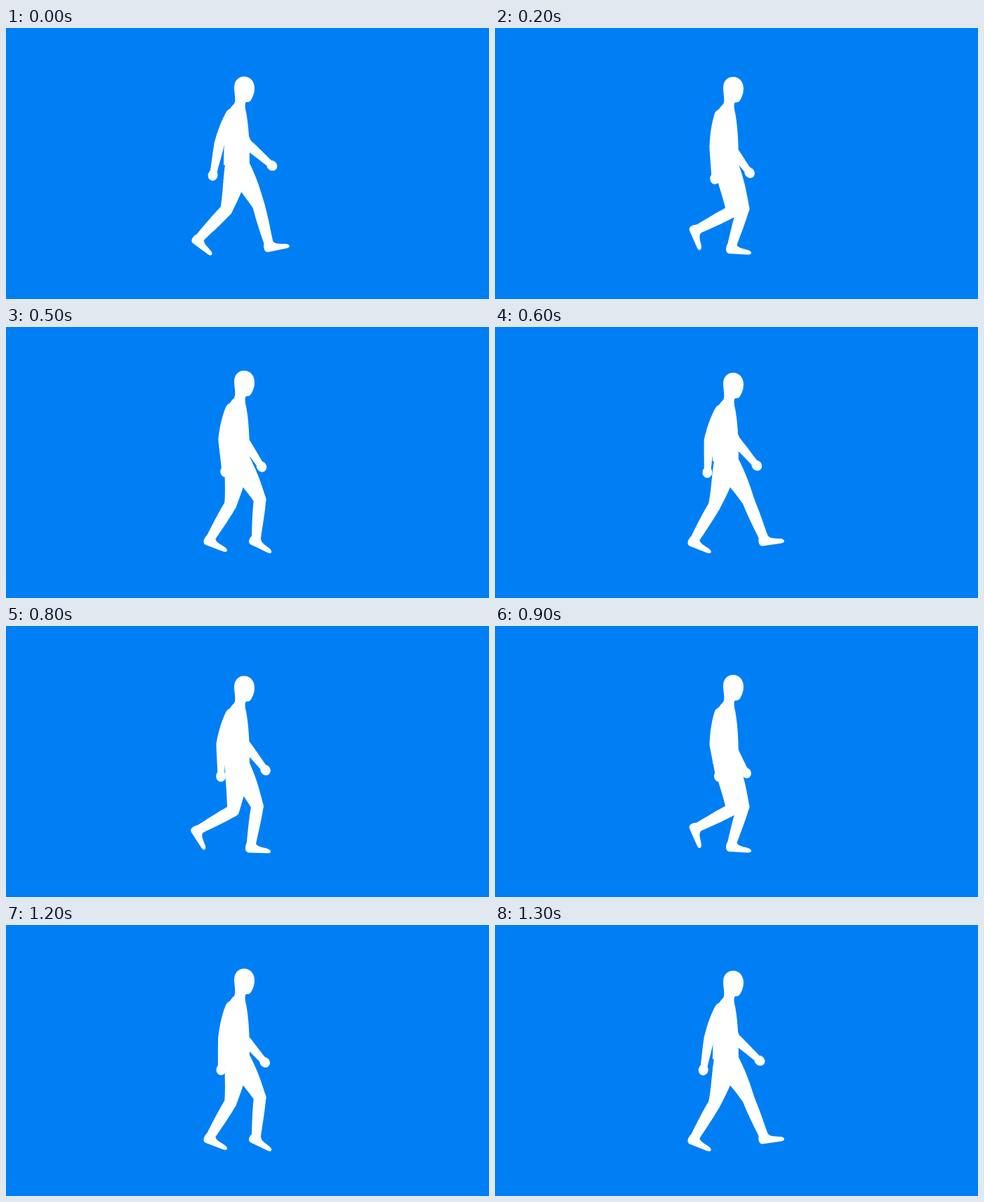
Animation of 690x388 px, one loop 1400 ms. Source, as an HTML page without scripts:

```html
<!DOCTYPE html>
<html lang="en">
<head>
<meta charset="utf-8">
<title>Walk cycle</title>
<style>
  /* One clock drives the whole figure: a full turn per two steps */
  @property --t {
    syntax: "<angle>";
    inherits: true;
    initial-value: 0deg;
  }
  @keyframes walk { to { --t: 360deg; } }

  html, body { margin: 0; width: 100%; height: 100%; overflow: hidden; background: #007ff5; }
  svg {
    display: block;
    width: 100%;
    height: 100%;
    fill: #fff;
    animation: walk 1.4s steps(14) infinite;
  }

  /* Opposite limbs run half a cycle apart */
  .near { --p: var(--t); --bend: 24deg; }
  .far { --p: calc(var(--t) + 180deg); --bend: 17deg; }

  .body { transform: translateY(calc(-1.2px + 4.8px * cos(2 * var(--t) - 54deg))); }

  .thigh {
    transform: translate(331px, 196px) rotate(calc(-11deg
      - 22.5deg * cos(var(--p) + 20deg)
      - 5deg * cos(2 * var(--p) - 155deg)));
  }
  .shin {
    transform: translateY(65px) rotate(calc(36.6deg
      + 18.2deg * cos(var(--p) + 115deg)
      + 21.6deg * cos(2 * var(--p) - 134deg)
      + 4.3deg * cos(3 * var(--p) - 95deg)
      + 5.3deg * cos(4 * var(--p) - 100deg)));
  }
  .foot {
    transform: translateY(55.5px) rotate(calc(
      16.3deg * cos(var(--p) + 71deg)
      + 5.5deg * cos(2 * var(--p) + 109deg)));
  }
  .upper { transform: translate(326px, 125px) rotate(calc(2deg - 27deg * cos(var(--p) + 6deg))); }
  .fore { transform: translateY(43px) rotate(calc(-1 * var(--bend))); }
</style>
</head>
<body>
<svg viewBox="0 0 690 388">
  <defs>
    <!-- Limb parts hang down from their joint at 0,0 -->
    <g id="leg">
      <g class="thigh">
        <path d="M-18 0C-17 18-11 38-8.5 65A8.7 8.7 0 0 0 9 65C13 45 16.5 28 17 0A17.5 17.5 0 0 0-18 0Z"/>
        <g class="shin">
          <path d="M-8.7 0C-9 22-7.5 40-6.5 56A6.5 6.5 0 0 0 6.5 56C7 40 9 22 8.7 0Z"/>
          <path class="foot" d="M-6.5-2C-9 3-9 11.5-3 11.5L23 11.5C30 11.5 30 7 24 5C16 3 9 3 6.5-2Z"/>
        </g>
      </g>
    </g>
    <g id="arm">
      <g class="upper">
        <path d="M-13 0C-13 15-11 28-7.5 43A7.3 7.3 0 0 0 7 43L8 0A10.5 10.5 0 0 0-13 0Z"/>
        <g class="fore">
          <path d="M-7.5 0C-7 15-5.5 30-5 42L5 42C5.5 30 7 15 7 0Z"/>
          <ellipse cy="47.5" rx="7" ry="8"/>
        </g>
      </g>
    </g>
  </defs>

  <g class="body">
    <!-- Head and torso -->
    <path d="M340 68C350 68 355 76 355 85C355 94 351 100 349 103C346 106 343 103 342 106C341 109 342 115 343 119C346 135 348 155 348 192L311 195C311 180 312 150 315 128C317 116 322 111 326 107C329 102 326 92 326 84C326 74 332 68 340 68Z"/>
    <use href="#leg" class="near"/>
    <use href="#leg" class="far"/>
    <use href="#arm" class="near"/>
    <use href="#arm" class="far"/>
  </g>
</svg>
</body>
</html>
```
